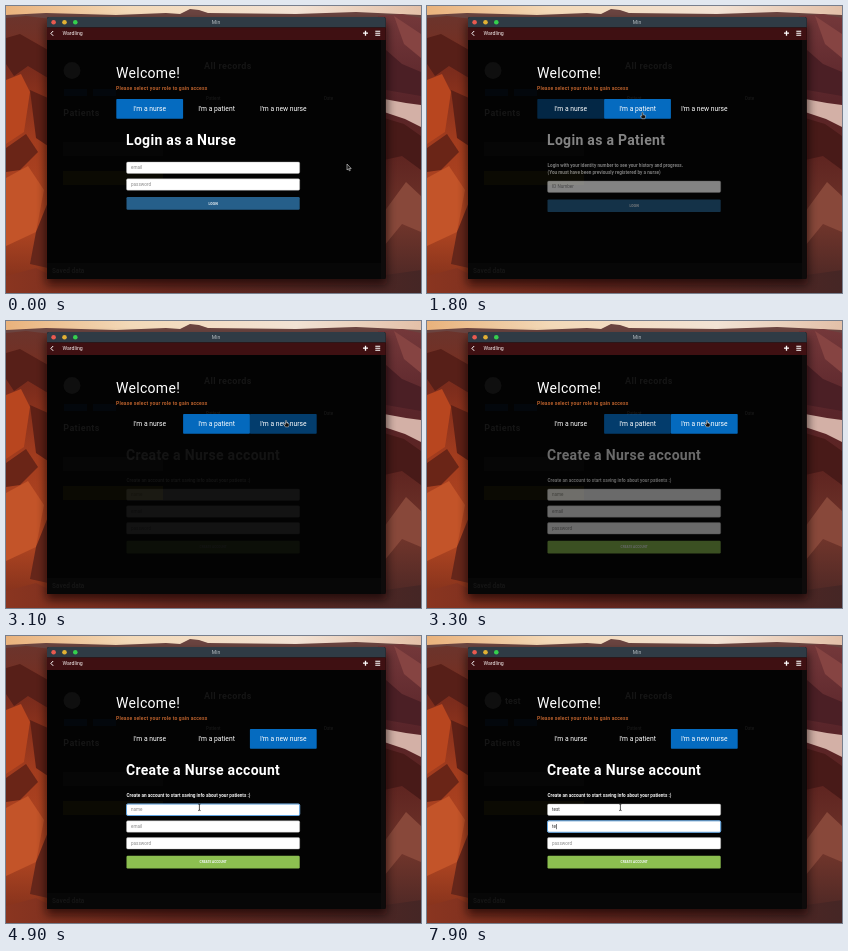
Write an HTML page that moves like this. It is 415 px wide and 287 px high and loops after 8000 ms.

```html
<!DOCTYPE html>
<html lang="en">
<head>
<meta charset="utf-8">
<title>Login screen</title>
<style>
  html, body { margin: 0; width: 100%; height: 100%; overflow: hidden; background: #000; }
  svg { display: block; width: 415px; height: 287px; font-family: Roboto, sans-serif; }
  .h { font-size: 14px; letter-spacing: .3px; fill: #fff; }
  .b { font-weight: 700; }
  .p { font-size: 4.65px; font-weight: 700; fill: #f2f2f2; }
  .tab { font-size: 6.75px; fill: #fff; text-anchor: middle; }
  .in { font-size: 4.6px; }
  .btn { font-size: 3.2px; font-weight: 700; text-anchor: middle; }
  .dim { font-weight: 700; fill: #151515; }
</style>
</head>
<body>
<svg id="stage" viewBox="0 0 415 287">
  <defs>
    <linearGradient id="sky" x1="0" x2="1" y1="0" y2="0">
      <stop offset="0" stop-color="#e9b27c"/><stop offset=".3" stop-color="#f3d9b8"/>
      <stop offset=".7" stop-color="#f2e2d4"/><stop offset="1" stop-color="#e3c0a8"/>
    </linearGradient>
    <linearGradient id="left" x1="0" x2="0" y1="0" y2="1">
      <stop offset="0" stop-color="#6b342c"/><stop offset=".2" stop-color="#7c2c1c"/>
      <stop offset=".45" stop-color="#a23c1e"/><stop offset=".75" stop-color="#b34722"/><stop offset="1" stop-color="#7a2d1b"/>
    </linearGradient>
    <linearGradient id="right" x1="0" x2="0" y1="0" y2="1">
      <stop offset="0" stop-color="#74383a"/><stop offset=".3" stop-color="#59252a"/>
      <stop offset=".5" stop-color="#5e2420"/><stop offset=".75" stop-color="#70352b"/><stop offset="1" stop-color="#462524"/>
    </linearGradient>
    <linearGradient id="floor" x1="0" x2="1" y1="0" y2="0">
      <stop offset="0" stop-color="#8a3520"/><stop offset=".4" stop-color="#69281f"/><stop offset="1" stop-color="#452625"/>
    </linearGradient>
    <filter id="soft" x="-10%" y="-10%" width="120%" height="120%"><feGaussianBlur stdDeviation="5"/></filter>
  </defs>

  <!-- desert wallpaper -->
  <rect width="415" height="287" fill="url(#sky)"/>
  <path d="M0 9L40 7 110 9 160 7 174 8 184 3 193 4 202 7 290 8 350 6 415 9V40H0Z" fill="#6a4440"/>
  <path d="M0 12L20 10 46 13V287H0Z" fill="url(#left)"/>
  <path d="M0 32L14 28 42 44V72L22 60 8 70 0 58Z" fill="#571f18"/>
  <path d="M0 74L15 68 24 86 18 126 0 138Z" fill="#b8461f"/>
  <path d="M24 84L42 92V140L30 132Z" fill="#5e2016"/>
  <path d="M0 142L20 128 32 146 14 164 0 166Z" fill="#6a2517"/>
  <path d="M0 172L22 160 38 184 30 226 0 240Z" fill="#c35429"/>
  <path d="M30 226L42 196V262L24 258Z" fill="#65261a"/>
  <path d="M372 10L396 8 415 12V287H372Z" fill="url(#right)"/>
  <path d="M388 10L415 28V52L398 38Z" fill="#864442"/>
  <path d="M380 44L396 58 415 66V90L380 84Z" fill="#4b1f25"/>
  <path d="M378 93L400 97 415 99V121L399 113 378 106Z" fill="#d3b0a6"/>
  <path d="M378 112L398 118 415 130V164L396 150 378 154Z" fill="#481a18"/>
  <path d="M378 206L400 176 415 190V226L396 218 378 240Z" fill="#88483a"/>
  <path d="M0 270L30 262 46 270H372L415 264V287H0Z" fill="url(#floor)"/>

  <!-- window -->
  <rect x="40" y="16" width="341" height="263" rx="4" fill="#100406" opacity=".65" filter="url(#soft)"/>
  <rect x="41" y="11" width="338.700" height="262" rx="2" fill="#030303"/>
  <path d="M41 21.500V13Q41 11 43 11H377.700Q379.700 11 379.700 13V21.500Z" fill="#2f3b45"/>
  <circle cx="47.600" cy="16.300" r="2.300" fill="#ea5a50"/>
  <circle cx="58.500" cy="16.300" r="2.300" fill="#e2b034"/>
  <circle cx="69.300" cy="16.300" r="2.300" fill="#35d04e"/>
  <text x="210" y="18.200" font-size="5" text-anchor="middle" fill="#b4bcc2">Min</text>
  <rect x="41" y="21.500" width="338.700" height="12.500" fill="#3f1012"/>
  <path d="M47.200 25L44.900 27.400 47.200 29.800" fill="none" stroke="#fff" stroke-width="1"/>
  <text x="56.500" y="29.300" font-size="5.200" fill="#f4eeee">Wardling</text>
  <path d="M357 27.200H362M359.500 24.700V29.700" stroke="#fff" stroke-width="1.300"/>
  <path d="M369.300 25.300H374.200M369.300 27.300H374.200M369.300 29.300H374.200" stroke="#fff" stroke-width="1.100"/>

  <!-- page under the dark overlay -->
  <circle cx="66" cy="64.500" r="8.500" fill="#0f0f0f"/>
  <text id="who" class="dim" x="78" y="68" font-size="9"></text>
  <rect x="58" y="83" width="23" height="7" fill="#03070c"/>
  <rect x="87" y="83" width="23" height="7" fill="#03070c"/>
  <text class="dim" x="57.300" y="110.300" font-size="9" letter-spacing=".35">Patients</text>
  <rect x="57" y="136" width="100" height="14" fill="#060606"/>
  <rect x="57" y="165" width="100" height="14" fill="#0b0a03"/>
  <text class="dim" x="198" y="62.500" font-size="9" letter-spacing=".35">All records</text>
  <text class="dim" x="200" y="94" font-size="4.500">Patient</text>
  <text class="dim" x="318" y="94" font-size="4.500">Date</text>
  <rect x="41" y="257" width="334" height="16" fill="#070707"/>
  <text class="dim" x="46" y="266.500" font-size="6.500">Saved data</text>
  <rect x="375" y="34" width="4.500" height="239" fill="#0e0b0b"/>

  <!-- dialog -->
  <text class="h" x="110" y="72">Welcome!</text>
  <text class="b" x="110" y="84" font-size="5" letter-spacing=".18" fill="#b9602c">Please select your role to gain access</text>
  <g id="tabs"></g>
  <g id="forms"></g>
  <g id="cursor">
    <path d="M0 0V6L1.400 4.800 2.300 6.800 3.300 6.400 2.400 4.500H4.200Z" fill="#111" stroke="#ddd" stroke-width=".6"/>
    <path d="M-.6 0Q0 -.7 .6 0V2.200L3 2.900Q3.400 4.600 2.400 6.200H-.6L-2.300 3.500Q-1.900 2.700 -.6 3.700Z" fill="#111" stroke="#ddd" stroke-width=".5"/>
    <path d="M-1.100 0Q0 0 0 .8Q0 0 1.100 0M0 .7V6M-1.100 6.600Q0 6.600 0 5.800Q0 6.600 1.100 6.600" fill="none" stroke="#222" stroke-width=".8"/>
  </g>
</svg>
<script>
const $ = id => document.getElementById(id);
const LOOP = 8000, LEFT = 120.5, WIDE = 173.2;
const TO_PATIENT = 1500, TO_ACCOUNT = 3070, FADE = 1000;

function add(parent, tag, attrs, text) {
  const el = document.createElementNS('http://www.w3.org/2000/svg', tag);
  for (const k in attrs) el.setAttribute(k, attrs[k]);
  if (text) el.textContent = text;
  parent.appendChild(el);
  return el;
}
const set = (el, k, v) => el.setAttribute(k, v);
const ramp = (t, a, b) => Math.max(0, Math.min(1, (t - a) / (b - a)));
const smooth = x => x * x * (3 - 2 * x);
const easeOut = x => 1 - (1 - x) ** 2;

const tabs = ["I'm a nurse", "I'm a patient", "I'm a new nurse"].map((label, i) => {
  const x = 110.3 + i * 66.8;
  const box = add($('tabs'), 'rect', { x, y: 93, width: 66.8, height: 19.7, rx: .8, fill: '#056bc0' });
  add($('tabs'), 'text', { class: 'tab', x: x + 33.4, y: 105.2 }, label);
  return box;
});

function field(g, y, hint) {
  const shape = { x: LEFT, y, width: WIDE, height: 11.5, rx: 1.4 };
  add(g, 'rect', { ...shape, fill: '#fff', stroke: '#aaa', 'stroke-width': .4 });
  const ring = add(g, 'rect', { ...shape, fill: 'none', stroke: '#5fa3e0', 'stroke-width': 1 });
  const text = add(g, 'text', { class: 'in', x: 125, y: y + 7.4 }, hint);
  const caret = add(g, 'rect', { y: y + 3.2, width: .6, height: 5.2, fill: '#222' });
  const f = { ring, caret, text, hint };
  fill(f, '', 0, false);
  return f;
}
function fill(f, value, focus, blink) {
  f.text.textContent = value || f.hint;
  set(f.text, 'fill', value ? '#333' : '#8a8a8a');
  set(f.ring, 'opacity', focus);
  set(f.caret, 'x', 125.1 + (value ? f.text.getComputedTextLength() : 0));
  set(f.caret, 'opacity', blink ? 1 : 0);
}
function form(title, lines, hints, top, btnY, label, color) {
  const g = add($('forms'), 'g', {});
  add(g, 'text', { class: 'h b', x: 120, y: 139 }, title);
  lines.forEach((s, i) => add(g, 'text', { class: 'p', x: 120.5, y: 161 + i * 7 }, s));
  const fields = hints.map((s, i) => field(g, top + i * 16.8, s));
  add(g, 'rect', { x: LEFT, y: btnY, width: WIDE, height: 12.7, rx: 1.2, fill: color });
  add(g, 'text', { class: 'btn', x: 207.2, y: btnY + 7.5, fill: '#f2f6f8' }, label);
  return { g, fields };
}
const nurse = form('Login as a Nurse', [], ['email', 'password'], 156, 191, 'LOGIN', '#265f8a');
const patient = form('Login as a Patient',
  ['Login with your identity number to see your history and progress.', '(You must have been previously registered by a nurse)'],
  ['ID Number'], 175, 193.4, 'LOGIN', '#265f8a');
const account = form('Create a Nurse account', ['Create an account to start saving info about your patients :)'],
  ['name', 'email', 'password'], 168, 219.8, 'CREATE ACCOUNT', '#8cbf50');

// start, end, x, y of each cursor move
const moves = [[620, 1180, 215.5, 106.5], [1950, 2400, 262, 84.5], [2700, 3000, 280, 99.7], [3300, 3950, 193.4, 168]];
function cursorAt(t) {
  let x = 341, y = 158;
  for (const [a, b, tx, ty] of moves) {
    const k = smooth(ramp(t, a, b));
    x += (tx - x) * k;
    y += (ty - y) * k;
  }
  return [x, y];
}

const typed = (t, word, times) => word.slice(0, times.filter(k => t >= k).length);
const tint = (t, start) => smooth(ramp(t, start, start + 500));

function draw(t) {
  const [x, y] = cursorAt(t);
  set($('cursor'), 'transform', `translate(${x} ${y})`);
  const overTab = y > 93 && y < 112.7 && x < 311;
  const overInput = t > 3600 && y > 166;
  const kind = overTab ? 1 : overInput ? 2 : 0;
  [...$('cursor').children].forEach((c, i) => set(c, 'visibility', i === kind ? 'visible' : 'hidden'));

  // hovering already turns a tab blue, the click only keeps it so
  set(tabs[0], 'opacity', 1 - tint(t, TO_PATIENT));
  set(tabs[1], 'opacity', tint(t, 1050) * (1 - tint(t, TO_ACCOUNT)));
  set(tabs[2], 'opacity', tint(t, 2830));

  set(nurse.g, 'opacity', t < TO_PATIENT ? 1 : 0);
  set(patient.g, 'opacity', t < TO_ACCOUNT ? easeOut(ramp(t, TO_PATIENT, TO_PATIENT + FADE)) : 0);
  set(account.g, 'opacity', easeOut(ramp(t, TO_ACCOUNT, TO_ACCOUNT + FADE)));

  const name = typed(t, 'test', [5400, 5700, 5900, 6400]);
  const mail = typed(t, 'te', [7700, 7900]);
  const swap = ramp(t, 6850, 7150);
  const nameCaret = t >= 4400 && t < 6900 && !(t >= 4900 && t < 5400);
  const mailCaret = t >= 7000 && !(t >= 7500 && t < 7700);
  fill(account.fields[0], name, ramp(t, 4350, 4600) * (1 - swap), nameCaret);
  fill(account.fields[1], mail, swap, mailCaret);
  $('who').textContent = name;
}

const begin = performance.now();
function tick() {
  draw((performance.now() - begin) % LOOP);
  requestAnimationFrame(tick);
}
draw(0);
requestAnimationFrame(tick);
</script>
</body>
</html>
```
